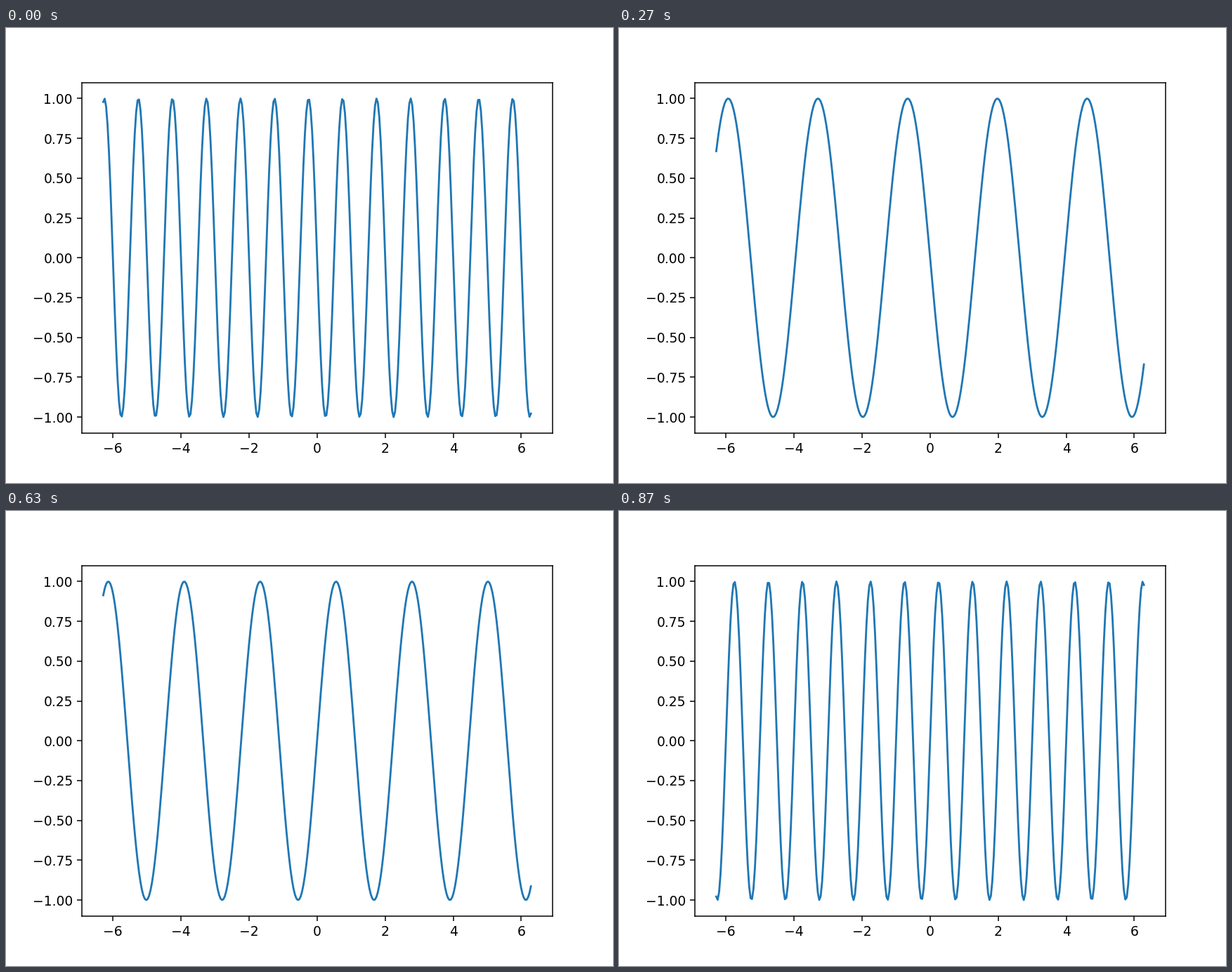
A matplotlib script for the animation above (0.9 s loop, 864 by 648 pixels).

```python
import numpy as np
import matplotlib.pyplot as plt
from matplotlib.animation import FuncAnimation

FRAMES = 30
INTERVAL = 30  # ms

x = np.linspace(-2 * np.pi, 2 * np.pi, 300)
freqs = np.linspace(-2 * np.pi, 2 * np.pi, FRAMES)

fig, ax = plt.subplots(figsize=(6.4, 4.8), dpi=135)
line, = ax.plot(x, np.sin(freqs[0] * x))


def update(i):
    """Draw the sine for one frequency and refit the axes to it."""
    line.set_ydata(np.sin(freqs[i] * x))
    ax.relim()
    ax.autoscale_view()
    return line,


def reset():
    return update(0)


anim = FuncAnimation(fig, update, frames=FRAMES, init_func=reset,
                     interval=INTERVAL, repeat=True, repeat_delay=0,
                     blit=False)

plt.show()
```
